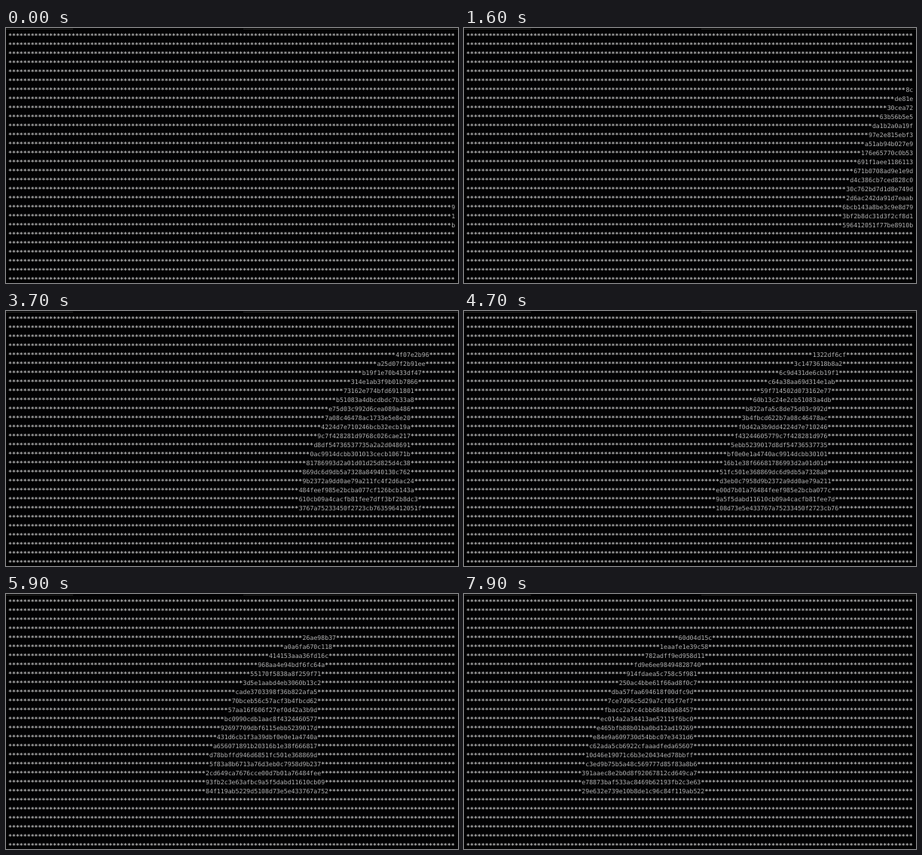
Animation, 600 px wide and 339 px high, one loop 8000 ms. Source, as an HTML page with a canvas:

```html
<!DOCTYPE html>
<html lang="en">
<head>
<meta charset="utf-8">
<title>Crescent over hex</title>
<style>
  html, body { margin: 0; width: 100%; height: 100%; overflow: hidden; background: #020203; }
  canvas { display: block; }
</style>
</head>
<body>
<canvas id="stage" width="600" height="339"></canvas>
<script>
const ctx = document.getElementById('stage').getContext('2d');
const COLS = 120, ROWS = 28, CELL = 4.944, LINE = 12, LEFT = 3, BASELINE = 13;
const LOOP = 8000, TICK = 100, COLS_PER_MS = 0.01117, PHASE = 0.48;

// Ticks at which the terminal misses a redraw and keeps the last picture.
const HELD = new Set([1, 10, 15, 18, 23, 33, 41, 44, 49, 57, 66, 69, 74, 77]);

// Readable text behind the stars, one line per row, flush right.
const TOP_ROW = 4;
const TEXT = `
60d04d15c7e3ab4497d4ab26ae98b37c05d11322df6cf8a4f07e2b96d20eecb
1eaafe1e39c58c993fa9d6a0a6fa670c118e3c1473618b8a25d07f2b91ee3a7979ff
782adff9ed958d11f86a49414153aaa36fd16c9d431de6cb19f1e70b433df47df4315a8c
fd9e6ee984948287408671968aa4e94bdf6fc64a38aa69d314e1ab3f9b01b786624e62de81e
914fdaea5c758c5f9819ac55170f5838a8f259f714502d073162e774bfd6911801dc3d30cea72
250ac4bbe61f66ad8f0c7c3d5e1aabd4eb3060b13c24e2cb51083a4dbcdbdc7b33a83363b56b5e5
dba57faa694618f00dfc9dcade3703398f36b822afa5c8de75d03c992d6cea089a486ada1b2a0a19f
7ce7d96c5d29a7cf05f7ef70bceb56c57acf3b4fbcd622b7a08c46478ac1733e5e8e2097e2e815ebf3
fbacc2a7c4cbb684d0a68457aa16f606f27ef0d42a3b9dd4224d7e710246bcb32ecb19a51ab94b027e9
ec014a2a34413ae52115f6bc0990cdb1aac8f43244605779c7f428281d9768c026cae2176e65770c0b53
e465bfb88b01ba0bd12ad192697709dbf6115ebb5239017d8df54736537735a2a2d048691f1aee1186113
e84e9a609730d54bbc07e3431d6cb1f3a39dbf0e0e1a4740ac9914dcbb301013cecb10671b0708ad9e1e9d
c62ada5cb6922cfaaadfeda656071891b20316b1e38f66681786993d2a01d01d25d825d4c386cb7ced828c0
10d46e19071c6b3e20434ed78bbffd946d6851fc501e368869dc6d9db5a7328a84940130c762bd7d1d8e749d
c3ed9b75b5a48c569777d85f83a8b6713a76d3eb0c7958d9b2372a9dd0ae79a211fc4f2d6ac242da91d7eaab
391aaec8e2b0d8f92067812cd649ca7676cce00d7b01a76484feef985e2bcba077cf126bcb143a8be3c9e8d79
e78873baf533ac8469b62193fb2c3e63afbc9a5f5dabd11610cb09a4cacfb81fee7dff3bf2b8dc31d3f2cf8d1
29e632e739e10b8de1c96c84f119ab5229d5108d73e5e433767a75233450f2723cb763596412051f77be8910b
`.trim().split('\n').map(line => line.padStart(COLS));

// Crescent outline: first column and end column of each row.
const START = [26, 21, 17, 14, 12, 10, 8, 7, 6, 5, 4, 3, 2, 1, 1, 0, 0, 0];
const END = [35, 34, 33, 32, 31, 31, 30, 30, 30, 30, 30, 30, 30, 30, 31, 31, 32, 33];

function crescentLeft(tick) {
  if (HELD.has(tick)) tick--;
  return COLS - 1 - Math.floor(PHASE + tick * TICK * COLS_PER_MS);
}

function write(text, col, row, weight) {
  ctx.font = `${weight} 8.212px "DejaVu Sans Mono", monospace`;
  ctx.fillText(text, LEFT + col * CELL, BASELINE + row * LINE);
}

function draw(left) {
  ctx.fillStyle = '#020203';
  ctx.fillRect(0, 0, 600, 339);
  ctx.fillStyle = '#252525';
  ctx.fillRect(0, 1, 89, 1);
  ctx.fillRect(315, 1, 285, 1);

  ctx.textRendering = 'geometricPrecision';
  ctx.fillStyle = '#b4b4b4';
  for (let row = 0; row < ROWS; row++) {
    const i = row - TOP_ROW;
    const inside = i >= 0 && i < TEXT.length;
    const from = inside ? Math.min(COLS, left + START[i]) : COLS;
    const to = inside ? Math.min(COLS, left + END[i]) : COLS;
    write('*'.repeat(from), 0, row, 'bold');
    write('*'.repeat(COLS - to), to, row, 'bold');
    if (inside) write(TEXT[i].slice(from, to), from, row, 'normal');
  }
}

let shown;
function frame() {
  const left = crescentLeft(Math.floor(performance.now() % LOOP / TICK));
  if (left !== shown) draw(shown = left);
  requestAnimationFrame(frame);
}
frame();
</script>
</body>
</html>
```
